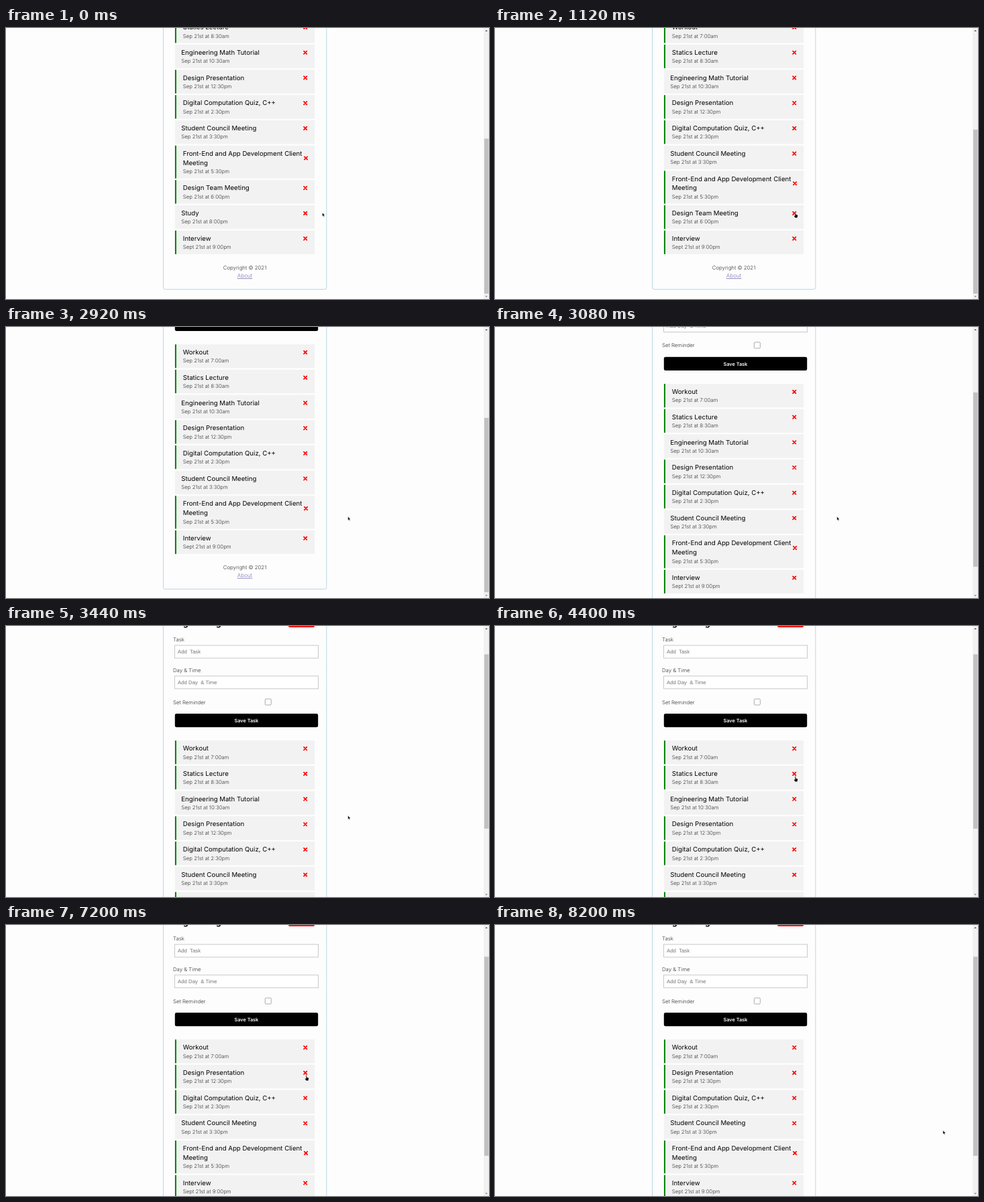
Write an HTML page that moves like this. It is 720 px wide and 405 px high and loops after 8320 ms.

```html
<!DOCTYPE html>
<html lang="en">
<head>
<meta charset="utf-8">
<title>Task list</title>
<style>
  html, body { margin: 0; height: 100%; overflow: hidden; background: #fdfdfd; }
  svg { display: block; width: 100vw; height: 100vh; }
  text { font: 300 7.8px Inter, sans-serif; fill: #333; white-space: pre; text-rendering: geometricPrecision; }
  .title { font-size: 9.63px; font-weight: 400; fill: #000; }
  .hint { font: 7.8px "Liberation Sans", Arial, sans-serif; fill: #757575; }
  .head { font-size: 12.2px; font-weight: 700; fill: #000; }
  .save { font-size: 7.3px; font-weight: 600; fill: #fff; }
  .mid { text-anchor: middle; }
  .link { font-size: 8.2px; fill: #8478b8; text-decoration: underline; }
  .field { fill: #fff; stroke: #c8c8c8; }
  .cross { stroke: #f00; stroke-width: 1.7; stroke-linecap: round; }
</style>
</head>
<body>
<svg viewBox="0 0 720 405">
  <g id="page">
    <rect id="card" x="234.5" y="-60" width="243.3" rx="2.5" fill="none" stroke="#b8d8e6"/>
    <text class="head" x="249" y="-.3">Engineering</text>
    <rect x="421" y="-18" width="39" height="20" rx="2" fill="#f00"/>
    <text x="249" y="23">Task</text>
    <rect class="field" x="251.5" y="29" width="214" height="19"/>
    <text class="hint" x="256" y="41.2">Add  Task</text>
    <text x="249" y="69.2">Day &amp; Time</text>
    <rect class="field" x="251.5" y="74.8" width="214" height="19"/>
    <text class="hint" x="256" y="87">Add Day  &amp; Time</text>
    <text x="249" y="116.5">Set Reminder</text>
    <rect x="386.3" y="109" width="9" height="9" rx="1.2" fill="#fff" stroke="#8a8a8a" stroke-width=".7"/>
    <rect x="251.8" y="131" width="213.4" height="20.3" rx="2.4"/>
    <text class="save mid" x="358.4" y="144.2">Save Task</text>
    <g id="list"></g>
    <g id="foot">
      <text class="mid" x="356" y="23">Copyright © 2021</text>
      <text class="mid link" x="356" y="35.1">About</text>
    </g>
  </g>
  <rect x="712" width="8" height="405" fill="#f1f1f1"/>
  <rect id="thumb" x="713" width="6.5" fill="#c1c1c1"/>
  <path d="M714.3 5l1.8-2 1.8 2z" fill="#505050"/>
  <path d="M714.3 400.5l1.8 2 1.8-2z" fill="#808080"/>
  <g id="cursor" stroke="#fff" stroke-width=".5">
    <path id="arrow" d="M0 0v5.6l1.3-1.1.9 2 1-.4-.9-2h1.7z"/>
    <path id="hand" d="M-.7.2q.7-.9 1.4 0v2.8l2.2.6q.8.3.7 1.2l-.5 2.2v1.2h-3.5l-1.9-2.9q-.1-1 .8-.7l.8.6z"/>
  </g>
</svg>
<script>
const LOOP = 8320, TOP = 171.2, GAP = 2.43, VIEW = 405;
const $ = id => document.getElementById(id);

// title lines, date, reminder set, time of removal
const tasks = [
  [["Workout"], "Sep 21st at 7:00am", true],
  [["Statics Lecture"], "Sep 21st at 8:30am", true, 6200],
  [["Engineering Math Tutorial"], "Sep 21st at 10:30am", false, 7080],
  [["Design Presentation"], "Sep 21st at 12:30pm", true],
  [["Digital Computation Quiz, C++"], "Sep 21st at 2:30pm", true],
  [["Student Council Meeting"], "Sep 21st at 3:30pm", false],
  [["Front-End and App Development Client", "Meeting"], "Sep 21st at 5:30pm", true],
  [["Design Team Meeting"], "Sep 21st at 6:00pm", true, 2080],
  [["Study"], "Sep 21st at 8:00pm", false, 1120],
  [["Interview"], "Sept 21st at 9:00pm", true]
].map(([lines, date, green, gone = Infinity]) => {
  const extra = (lines.length - 1) * 13.8, height = 35.3 + extra;
  const x = green ? 263.8 : 261.3, cx = extra ? 447 : 446.2, cy = 11.9 + extra / 2;
  const node = document.createElementNS("http://www.w3.org/2000/svg", "g");
  node.innerHTML =
    `<rect x="251.9" width="208.3" height="${height}" fill="#f2f2f2"/>` +
    (green ? `<rect x="251.9" width="2" height="${height}" fill="#008000"/>` : "") +
    lines.map((s, i) => `<text class="title" x="${x}" y="${15.1 + i * 13.8}">${s}</text>`).join("") +
    `<text x="${x}" y="${27.5 + extra}">${date}</text>` +
    `<path class="cross" d="M${cx - 2.2} ${cy - 2.2}l4.4 4.4m0-4.4l-4.4 4.4"/>`;
  $("list").append(node);
  return { node, height, gone };
});

// time, x, y of the pointer tip
const moves = [
  [80, 471.5, 276], [360, 447.8, 275.6], [2440, 447.8, 275.6], [2800, 509.7, 283.3],
  [3480, 509.7, 283.3], [3640, 492, 273], [4240, 447.8, 224.6], [7600, 447.8, 224.6], [8160, 667.8, 307]
];
const clamp = u => Math.min(1, Math.max(0, u));
const smooth = u => u * u * (3 - 2 * u);

function pointer(t) {
  const i = moves.findIndex(m => m[0] > t);
  if (i < 1) return moves.at(i).slice(1);
  const [t0, x0, y0] = moves[i - 1], [t1, x1, y1] = moves[i];
  const p = smooth((t - t0) / (t1 - t0));
  return [x0 + (x1 - x0) * p, y0 + (y1 - y0) * p];
}

function draw(t) {
  let y = TOP;
  for (const { node, height, gone } of tasks) {
    const shown = t < gone;
    node.setAttribute("display", shown ? "inline" : "none");
    node.setAttribute("transform", `translate(0 ${y})`);
    if (shown) y += height + GAP;
  }
  const end = y - GAP, maxScroll = end - 338;
  const scroll = maxScroll * (1 - smooth(clamp((t - 2912) / 528) ** 0.72));
  $("foot").setAttribute("transform", `translate(0 ${end})`);
  $("card").setAttribute("height", end + 112.5);
  $("page").setAttribute("transform", `translate(0 ${-scroll})`);

  // 55px of the page lie above the form view
  const ratio = 390 / (maxScroll + 55 + VIEW);
  $("thumb").setAttribute("y", 7 + (scroll + 55) * ratio);
  $("thumb").setAttribute("height", VIEW * ratio);

  const [px, py] = pointer(t), over = px < 450;
  $("cursor").setAttribute("transform", `translate(${px} ${py})`);
  $("arrow").setAttribute("display", over ? "none" : "inline");
  $("hand").setAttribute("display", over ? "inline" : "none");
}

const start = performance.now();
function tick(now) {
  draw(Math.max(0, now - start) % LOOP);
  requestAnimationFrame(tick);
}
draw(0);
requestAnimationFrame(tick);
</script>
</body>
</html>
```
